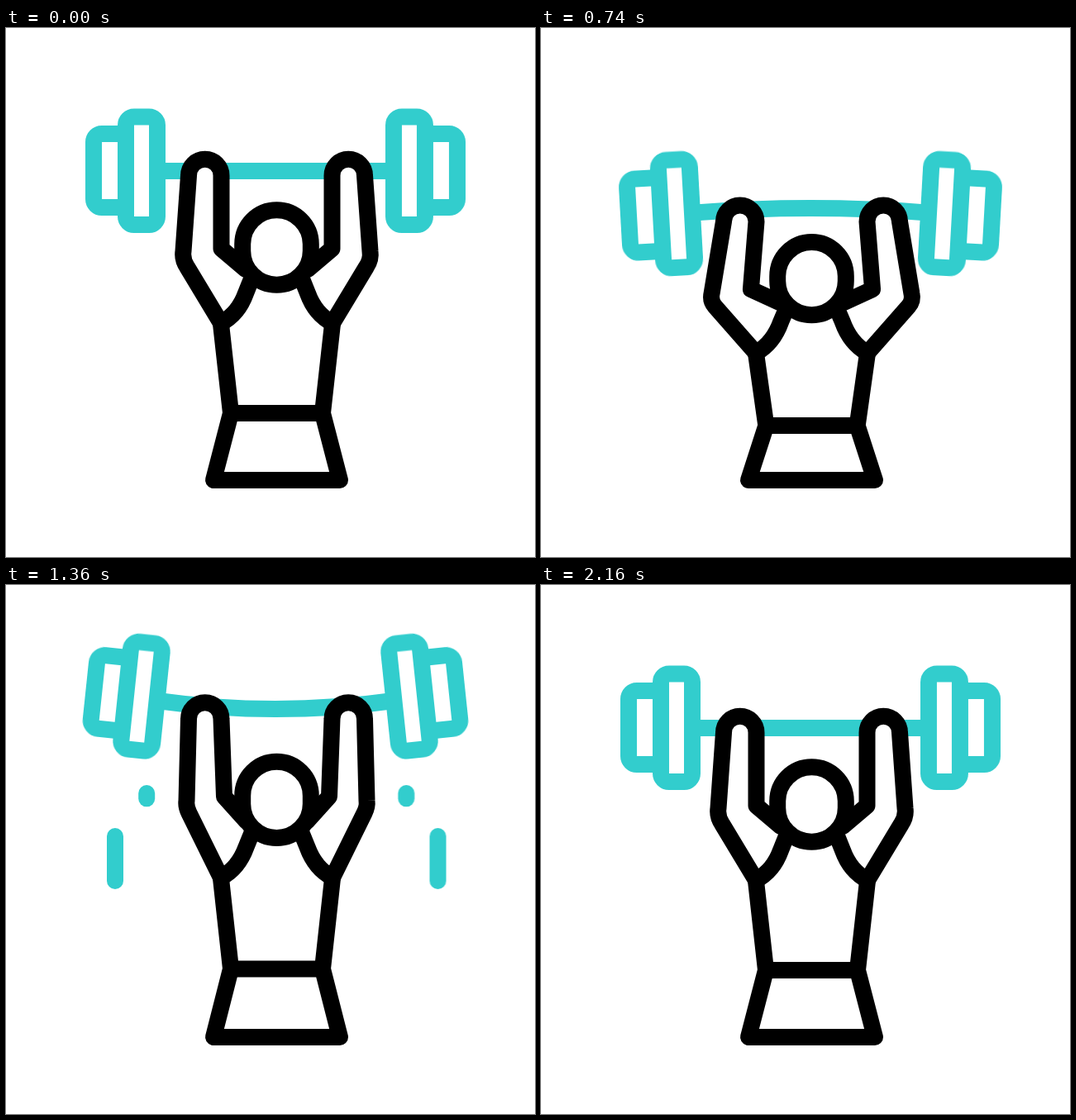
Recreate the animation shown at these times as an HTML page without scripts. Size 640 px wide and 640 px high, loop 2340 ms.

```html
<!DOCTYPE html>
<html lang="en">
<head>
<meta charset="utf-8">
<title>Overhead press</title>
<style>
html, body { margin: 0; width: 100%; height: 100%; overflow: hidden; background: #fff; }
svg { display: block; width: 100vw; height: 100vh; }
path, rect { fill: #fff; stroke: #000; stroke-width: 20; stroke-linecap: round; stroke-linejoin: round; }
.teal * { stroke: #32cdcd; }
.bar, .spark path { fill: none; }
.teal .bar { stroke-linecap: butt; }

.arm, .body, .head, .bar, .plate, .long, .short {
  animation: 2340ms linear infinite both;
}
.arm { animation-name: arm; }
.body { animation-name: body; }
.head { animation-name: head; }
.bar { animation-name: bar; }
.plate { animation-name: plate; }
.long { animation-name: long; }
.short { animation-name: short; }

/* squat 220-1100, drive up to 1300, lockout, settle by 2160 */
@keyframes arm {
  0%, 9.4%, 92.3%, 100% {
    d: path("M296 306 L290 321 Q281 346 260 357 L219 289 Q213 280 214.5 270 L221 178.5 A19.75 19.75 0 0 1 260.5 178.5 L260.5 267 L290 292");
    animation-timing-function: ease-in-out;
  }
  47% {
    d: path("M295 363 L290.5 373 Q281 400 260 412 L206 362 Q200 356.5 202.5 347.5 L221 263.5 A19.75 19.75 0 0 1 260.5 263.5 L250.5 342 L289 353.5");
    animation-timing-function: cubic-bezier(.4, 0, .4, 1);
  }
  55.5%, 58.12% {
    d: path("M297 301 L290.5 317 Q281 343 260 354 L221.5 276 Q217.5 268 218.5 261 L221 162 A19.75 19.75 0 0 1 260.5 162 L264 256 L291 286");
    animation-timing-function: ease-in-out;
  }
  70.1%, 77.8% {
    d: path("M297 296 L290.5 313 Q281 339 260 350 L220 271 Q216.5 264 217.5 257 L221 155 A19.75 19.75 0 0 1 260.5 155 L263 249 L291 280");
    animation-timing-function: ease-in-out;
  }
}
@keyframes body {
  0%, 9.4%, 92.3%, 100% {
    d: path("M260 358 L272 466 L251 547 H404 L383 466 L395 358 M272 466 H383");
    animation-timing-function: ease-in-out;
  }
  47% {
    d: path("M260 412 L272.5 489 L251 547 H404 L382.5 489 L395 412 M272.5 489 H382.5");
    animation-timing-function: cubic-bezier(.4, 0, .4, 1);
  }
  55.5%, 58.12% {
    d: path("M260 355 L272 464.5 L251 547 H404 L383 464.5 L395 355 M272 464.5 H383");
    animation-timing-function: ease-in-out;
  }
  70.1%, 77.8% {
    d: path("M260 351 L272 463 L251 547 H404 L383 463 L395 351 M272 463 H383");
    animation-timing-function: ease-in-out;
  }
}
@keyframes head {
  0%, 9.4%, 92.3%, 100% { y: 220.3px; height: 90.4px; animation-timing-function: ease-in-out; }
  47% { y: 279.3px; height: 87.2px; animation-timing-function: cubic-bezier(.4, 0, .4, 1); }
  55.5%, 58.12% { y: 213.7px; height: 92.3px; animation-timing-function: ease-in-out; }
  70.1%, 77.8% { y: 206.7px; height: 94.3px; animation-timing-function: ease-in-out; }
}
@keyframes bar {
  0%, 9.4% { d: path("M183 173 Q326 173 469 173"); animation-timing-function: ease-in; }
  16.24% { d: path("M183 176 Q326 176 469 176"); }
  31.62% { d: path("M183 223.5 Q326 212.5 469 223.5"); }
  43.59% { d: path("M183 257.5 Q326 234 469 257.5"); animation-timing-function: ease-out; }
  47% { d: path("M183 259.5 Q326 235.5 469 259.5"); animation-timing-function: cubic-bezier(.4, 0, .6, 1); }
  54.7% { d: path("M183 130 Q326 150 469 130"); animation-timing-function: ease-in; }
  58.12% { d: path("M183 140 Q326 160 469 140"); animation-timing-function: ease-in-out; }
  70.09% { d: path("M183 164.5 Q326 145.5 469 164.5"); animation-timing-function: ease-in-out; }
  78.2% { d: path("M183 141 Q326 161 469 141"); animation-timing-function: ease-in-out; }
  92.3%, 100% { d: path("M183 173 Q326 173 469 173"); }
}
@keyframes plate {
  0%, 9.4% { transform: translate(164px, 173px) rotate(0deg); animation-timing-function: ease-in; }
  16.24% { transform: translate(164px, 176px) rotate(0deg); }
  31.62% { transform: translate(164px, 224.7px) rotate(-3.2deg); }
  43.59% { transform: translate(163.7px, 259.6px) rotate(-5.8deg); animation-timing-function: ease-out; }
  47% { transform: translate(163.7px, 262px) rotate(-6deg); animation-timing-function: cubic-bezier(.4, 0, .6, 1); }
  54.7% { transform: translate(164px, 124px) rotate(6deg); animation-timing-function: ease-in; }
  58.12% { transform: translate(164px, 135px) rotate(6deg); animation-timing-function: ease-in-out; }
  70.09% { transform: translate(164px, 167px) rotate(-6deg); animation-timing-function: ease-in-out; }
  78.2% { transform: translate(164px, 136px) rotate(6deg); animation-timing-function: ease-in-out; }
  92.3%, 100% { transform: translate(164px, 173px) rotate(0deg); }
}
@keyframes long {
  0%, 51.9% { d: path("M132 390 L132 390.1"); visibility: hidden; }
  52% { d: path("M132 390 L132 390.1"); visibility: visible; }
  58.12% { d: path("M132 304 L132 358.5"); visibility: visible; }
  63.2% { d: path("M132 304 L132 304.1"); visibility: visible; }
  63.3%, 100% { d: path("M132 304 L132 304.1"); visibility: hidden; }
}
@keyframes short {
  0%, 51.9% { d: path("M170.2 320 L170.2 320.1"); visibility: hidden; }
  52% { d: path("M170.2 320 L170.2 320.1"); visibility: visible; }
  58.12% { d: path("M170.2 252 L170.2 258.5"); visibility: visible; }
  60.2% { d: path("M170.2 252 L170.2 252.1"); visibility: visible; }
  60.3%, 100% { d: path("M170.2 252 L170.2 252.1"); visibility: hidden; }
}
</style>
</head>
<body>
<svg viewBox="0 0 640 640">
  <g class="teal">
    <path class="bar"/>
    <g class="plate">
      <path d="M-19 -45 H-48 A10 10 0 0 0 -58 -35 V34 A10 10 0 0 0 -48 44 H-19"/>
      <rect x="-19" y="-65.5" width="38" height="130.5" rx="10"/>
    </g>
    <g transform="translate(652) scale(-1 1)">
      <g class="plate">
        <path d="M-19 -45 H-48 A10 10 0 0 0 -58 -35 V34 A10 10 0 0 0 -48 44 H-19"/>
        <rect x="-19" y="-65.5" width="38" height="130.5" rx="10"/>
      </g>
    </g>
    <g class="spark">
      <path class="long"/>
      <path class="short"/>
    </g>
    <g class="spark" transform="translate(654.5) scale(-1 1)">
      <path class="long"/>
      <path class="short"/>
    </g>
  </g>
  <path class="body"/>
  <path class="arm"/>
  <g transform="translate(655) scale(-1 1)"><path class="arm"/></g>
  <rect class="head" x="286.2" width="82.6" rx="41.3"/>
</svg>
</body>
</html>
```
